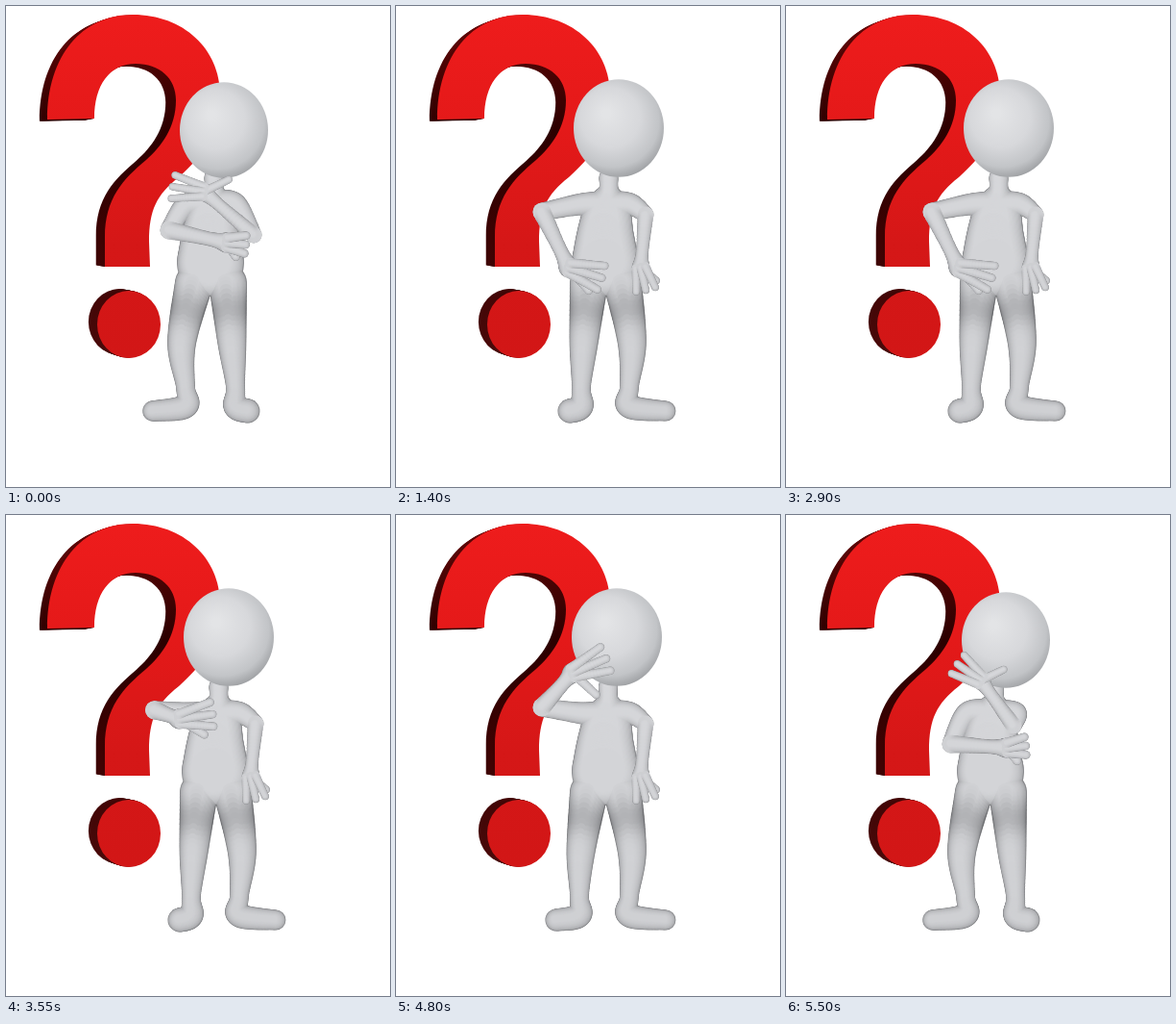
These frames come from a looping animation (400x500 px, 8 s). An HTML page with a canvas:

```html
<!DOCTYPE html>
<html lang="en">
<head>
<meta charset="utf-8">
<title>Thinking figure</title>
<style>
html, body { margin: 0; width: 100%; height: 100%; overflow: hidden; background: #fff; }
canvas { display: block; }
</style>
</head>
<body>
<canvas id="stage" width="400" height="500"></canvas>
<script>
const ctx = document.getElementById('stage').getContext('2d');

// Question mark
const mark = new Path2D(`M43 118 C43 52 79 9 132 9 C185 9 223 45 223 92
  C223 135 202 158 180 178 C157 196 149 212 149 245 L150 271 L103 271 L103 240
  C103 200 122 180 146 160 C162 146 177 126 177 98 C177 75 160 60 135 60
  C108 60 92 82 92 117 Z
  M161 331 A33 35 0 1 1 95 331 A33 35 0 1 1 161 331 Z`);

function fade(...colors) {
  const g = ctx.createLinearGradient(0, 9, 0, 366);
  colors.forEach((c, i) => g.addColorStop(i / (colors.length - 1), c));
  return g;
}
const side = fade('#640707', '#2c0000', '#3c0202', '#4a0a0a');
const face = fade('#ee1c1c', '#e41919', '#d51717', '#d21616');

// The sides are copies shrinking towards the back
function drawMark() {
  for (let d = 1; d >= 0; d -= 0.1) {
    const scale = 1 - 0.02 * d;
    ctx.save();
    ctx.translate(-7.2 * d, 200 * (1 - scale));
    ctx.scale(scale, scale);
    ctx.fillStyle = d < 0.05 ? face : side;
    ctx.fill(mark);
    ctx.restore();
  }
}

// head: x, y, radius    body: x    legs: ankle x, toe x, knee bend
// arms: elbow x, y, palm x, y, finger angle, thumb angle, finger length
const open = {
  head: [227, 129, 46], body: [213],
  legL: [187, 153, -8], legR: [239, 252, 0],
  armL: [170, 233, 230, 246, 0.1, 1, 20], armR: [258, 238, 206, 193, 3.3, -0.45, 33]
};
const think = {
  ...open, head: [229, 130, 46],
  armL: [172, 238, 230, 242, -0.1, 0.9, 20], armR: [237, 219, 203, 172, 3.75, -0.45, 30]
};
const front = {
  head: [227, 124, 47], body: [217],
  legL: [193, 181, -1], legR: [238, 247, 0],
  armL: [149, 212, 170, 272, 0.35, 0.95, 38], armR: [279, 213, 272, 268, 1.3, 0.8, 28]
};
const hips = {
  ...front, head: [232, 127, 47], body: [218], legR: [243, 281, 6],
  armL: [152, 214, 180, 272, 0.3, 0.85, 36], armR: [260, 217, 255, 272, 1.35, 0.7, 24]
};
const scratch = { ...hips, armL: [158, 187, 181, 128, -0.75, 0.15, 34] };
const cheek = {
  ...hips, head: [230, 127, 47], legL: [191, 167, -3],
  armL: [152, 200, 184, 164, -0.4, 0.75, 38]
};

const keys = [[0, open], [500, front], [700, hips], [3150, hips], [4050, scratch],
  [4500, scratch], [4800, cheek], [5500, think], [8000, think]];
const moves = [[0, 700], [1000, 2900], [3250, 4350], [4600, 5500]];

// Time advances in steps of 100 ms inside each move, and rests between them
function stepTime(t) {
  const [from, to] = moves.filter(m => m[0] <= t).pop();
  return Math.min(to, from + Math.floor((t - from) / 100) * 100);
}

function poseAt(t) {
  const i = keys.findIndex(k => k[0] > t);
  const [t0, a] = keys[i - 1], [t1, b] = keys[i];
  const u = (t - t0) / (t1 - t0), e = u * u * (3 - 2 * u);
  const p = {};
  for (const part in a) p[part] = a[part].map((v, k) => v + (b[part][k] - v) * e);
  if (t > 4050 && t < 4400) p.armL[4] += 0.1 * Math.sin((t - 4250) / 100 * Math.PI / 2);
  return p;
}

const spline = (a, b, c, d, u) => b + u / 2 * (c - a +
  u * (2 * a - 5 * b + 4 * c - d + u * (3 * (b - c) + d - a)));

// Row of circles along a smooth line through joints [x, y, radius];
// soft lightens the start so that it melts into what lies below
function tube(joints, soft = 0) {
  const at = i => joints[Math.max(0, Math.min(joints.length - 1, i))];
  const n = 14, dots = [];
  for (let i = 0; i <= (joints.length - 1) * n; i++) {
    const k = Math.floor(i / n);
    const [x, y, r] = [0, 1, 2].map(m =>
      spline(at(k - 1)[m], at(k)[m], at(k + 1)[m], at(k + 2)[m], i / n - k));
    dots.push({ x, y, r, glow: soft - i / 7, dim: Math.max(0, y - 190) * 0.03 });
  }
  return dots;
}

// Shrinking, brightening layers turn the joined circles into one rounded form
function skin(...tubes) {
  const dots = tubes.flat();
  for (let s = 0; s < 0.75; s += 0.06) {
    const light = Math.sqrt(1 - (1 - s) ** 2) ** 0.75;
    for (const { x, y, r, glow, dim } of dots) {
      const v = Math.round(142 + 74 * Math.max(light, glow) - dim);
      const inset = s * Math.min(r, 17);
      ctx.fillStyle = `rgb(${v},${v + 1},${v + 4})`;
      ctx.beginPath();
      ctx.arc(x - inset * 0.2, y - inset * 0.12, r - inset, 0, 7);
      ctx.fill();
    }
  }
}

function drawHead([x, y, r]) {
  const g = ctx.createRadialGradient(x - 13, y - 16, 4, x - 5, y - 6, 58);
  g.addColorStop(0, '#e3e4e6');
  g.addColorStop(0.5, '#d7d8db');
  g.addColorStop(0.82, '#c2c4c7');
  g.addColorStop(1, '#9fa1a4');
  ctx.fillStyle = g;
  ctx.beginPath();
  ctx.ellipse(x, y, r, r * 1.08, 0, 0, 7);
  ctx.fill();
}

// The legs darken below the belly
function leg(hip, [ankle, toe, bend]) {
  const knee = hip + (ankle - hip) * 0.55 + bend;
  const dots = tube([[hip, 288, 20], [knee, 350, 15], [ankle, 396, 10],
    [ankle, 416, 12.5], [toe, 421, 13.5 - Math.abs(toe - ankle) * 0.08]]);
  for (const d of dots) d.dim += 32 * Math.exp(-(((d.y - 316) / 18) ** 2));
  return dots;
}

function drawForearm([ex, ey, px, py, angle, thumb, length], r) {
  const wrist = [ex + (px - ex) * 0.72, ey + (py - ey) * 0.72, r * 0.78];
  skin(tube([[ex, ey, r], wrist, [px, py, r * 1.1]], 0.9));
  const finger = (x, y, a, len) => skin(tube([[x, y, r * 0.55],
    [x + len * Math.cos(a), y + len * Math.sin(a), r * 0.44]], 0.9));
  finger(px, py, thumb, length * 0.88);
  for (let k = 1; k >= -1; k--) {
    finger(px - 5 * k * Math.sin(angle), py + 5 * k * Math.cos(angle), angle + 0.22 * k, length);
  }
}

function drawFigure({ head, body: [x], legL, legR, armL, armR }) {
  const neck = x + (head[0] - x) * 0.25;
  const upperArm = (dx, [ex, ey], r) =>
    tube([[neck, 207, 15], [x + dx, 206, 11.5], [ex, ey, r]]);
  skin(tube([[neck, 178, 10], [neck, 194, 11], [x + 2, 214, 24], [x, 238, 29.5], [x, 267, 35]]),
    leg(x - 17, legL), leg(x + 18, legR), upperArm(-24, armL, 9.5), upperArm(26, armR, 8.5));
  drawHead(head);
  drawForearm(armR, 8.5);
  drawForearm(armL, 9.5);
}

let shown = -1;
function frame(now) {
  const t = stepTime(now % 8000);
  if (t !== shown) {
    shown = t;
    ctx.fillStyle = '#fff';
    ctx.fillRect(0, 0, 400, 500);
    drawMark();
    drawFigure(poseAt(t));
  }
  requestAnimationFrame(frame);
}
frame(0);
</script>
</body>
</html>
```
